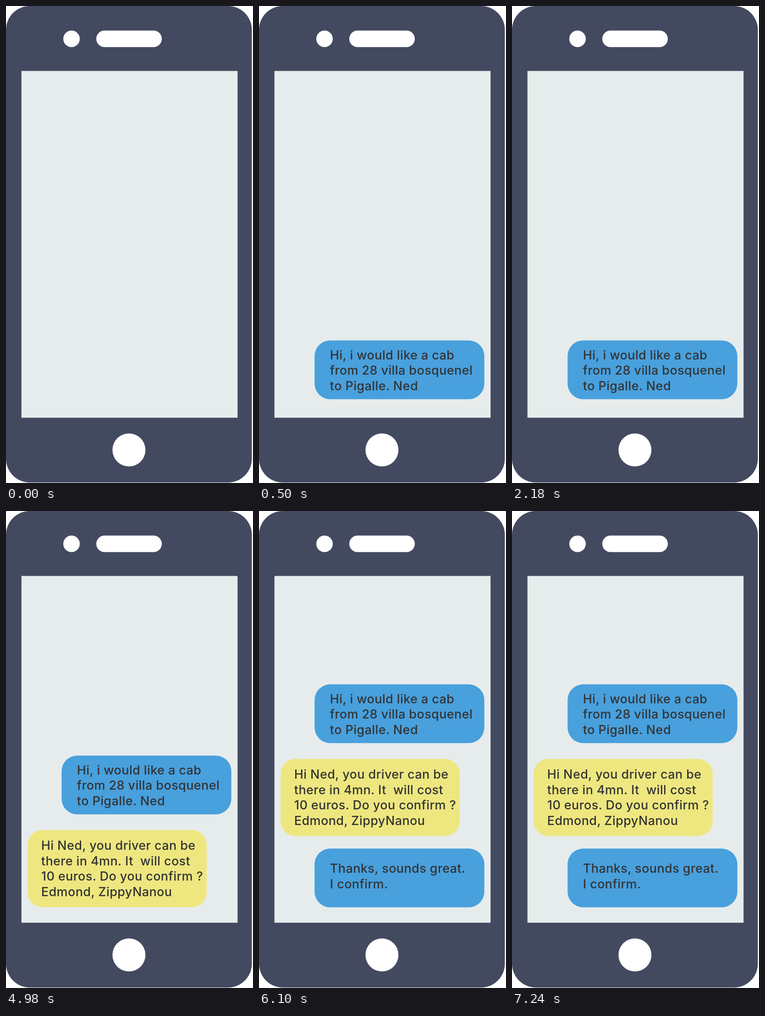
An HTML page for the animation above (8000 ms loop, 539 by 1039 pixels).

```html
<!DOCTYPE html>
<html lang="en">
<head>
<meta charset="utf-8">
<title>Cab by text message</title>
<style>
html, body { margin: 0; width: 100%; height: 100%; overflow: hidden; background: #fff; }
svg { display: block; }
text { font: 500 27px Inter, sans-serif; letter-spacing: .4px; fill: #333; white-space: pre; }
</style>
</head>
<body>
<svg width="539" height="1039" viewBox="0 0 539 1039">
  <rect width="536.5" height="1038" rx="52" fill="#434a60"/>
  <g fill="#fff">
    <circle cx="143" cy="71.5" r="18"/>
    <rect x="197" y="53.5" width="143" height="36" rx="18"/>
    <circle cx="268.3" cy="967" r="36"/>
  </g>
  <rect x="33.7" y="141.5" width="471.6" height="755.3" fill="#e6ecec"/>
  <g id="chat"></g>
</svg>
<script>
const LOOP = 8000, LINE = 33.7;
const STEPS = [500, 3300, 6100]; // when each message arrives

const me = { x: 121.3, w: 370.4, h: 128, r: 34, pad: 33.5, fill: '#48a0dd' };
const driver = { x: 47.3, w: 390.7, h: 168, r: 32, pad: 29.5, fill: '#eee780' };

// tops: position of the bubble after each arrival, from its own onward
const messages = [
  { ...me, base: 41, tops: [728.5, 532.8, 377.6],
    lines: ['Hi, i would like a cab', 'from 28 villa bosquenel', 'to Pigalle. Ned'] },
  { ...driver, base: 43, tops: [695, 540],
    lines: ['Hi Ned, you driver can be', 'there in 4mn. It  will cost',
            '10 euros. Do you confirm ?', 'Edmond, ZippyNanou'] },
  { ...me, base: 53, tops: [735.3],
    lines: ['Thanks, sounds great.', 'I confirm.'] }
];

const chat = document.getElementById('chat');

function add(parent, tag, attrs, text = '') {
  const el = document.createElementNS('http://www.w3.org/2000/svg', tag);
  for (const key in attrs) el.setAttribute(key, attrs[key]);
  el.textContent = text;
  return parent.appendChild(el);
}

for (const m of messages) {
  m.el = add(chat, 'g', { visibility: 'hidden' });
  add(m.el, 'rect', { width: m.w, height: m.h, rx: m.r, fill: m.fill });
  m.lines.forEach((line, i) => add(m.el, 'text', { x: m.pad, y: m.base + i * LINE }, line));
}

function draw(now) {
  const t = now % LOOP;
  const count = STEPS.filter(s => t >= s).length;
  messages.forEach((m, i) => {
    const shown = i < count;
    m.el.setAttribute('visibility', shown ? 'visible' : 'hidden');
    if (shown) m.el.setAttribute('transform', `translate(${m.x} ${m.tops[count - 1 - i]})`);
  });
  requestAnimationFrame(draw);
}
draw(performance.now());
</script>
</body>
</html>
```
